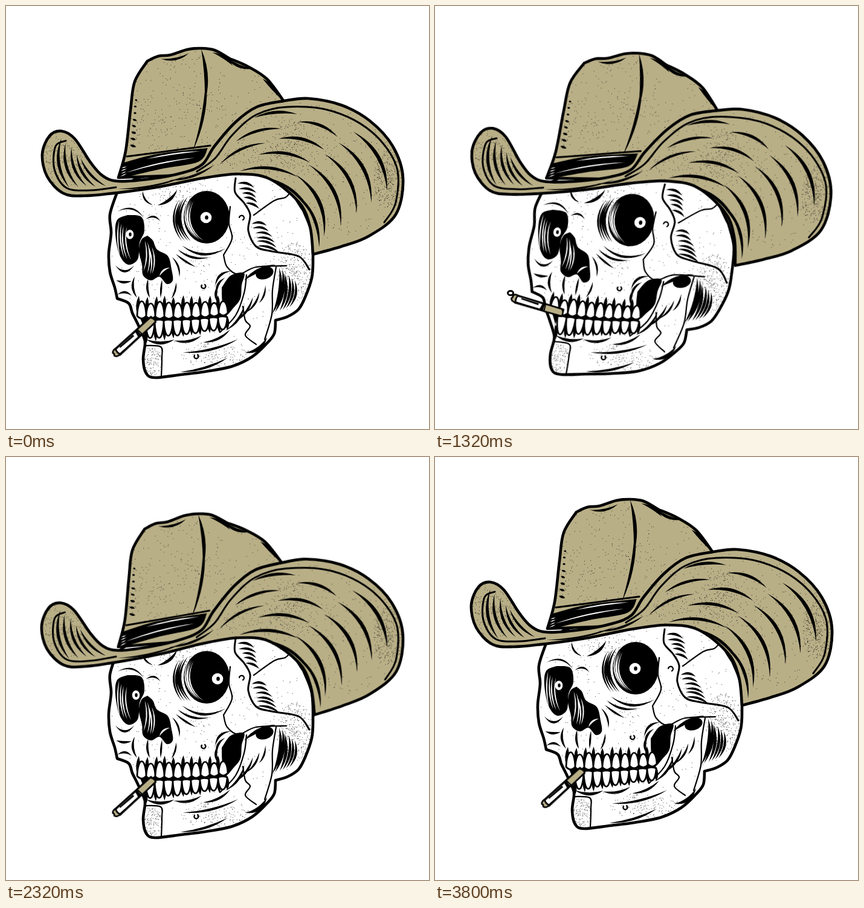
Write an HTML page that moves like this. It is 700 by 700 pixels and loops after 4 s.

```html
<!DOCTYPE html>
<html lang="en">
<head>
<meta charset="utf-8">
<title>Cowboy skull</title>
<style>
html, body { margin: 0; width: 100%; height: 100%; overflow: hidden; background: #fff; }
svg { display: block; width: 100vw; height: 100vh; }
path, ellipse, circle { stroke-linecap: round; stroke-linejoin: round; }
.line { fill: none; stroke: #000; stroke-width: 3; }
.thin { fill: none; stroke: #000; stroke-width: 2.2; }
.shape { stroke: #000; stroke-width: 4.6; }
.tan { fill: #b9af87; }
.bone { fill: #fff; }
.dots { fill: none; stroke: #000; stroke-width: .85; }
.hair { fill: #fff; }

#hat, #skull, #cig, #eyeL, #eyeR, #puff, #ball, #drop, #ash {
  animation: 4s ease-in-out infinite;
}
#hat { animation-name: hat; }
#skull { animation-name: skull; }
#cig { animation-name: cig; }
#eyeL { animation-name: eyeL; }
#eyeR { animation-name: eyeR; }
#puff { animation-name: puff; }
#ball { animation-name: ball; }
#drop { animation-name: drop; }
#ash { animation-name: ash; }

@keyframes hat {
  0%, 9%, 95%, 100% { transform: matrix(1, 0, 0, 1, 0, 0); }
  22.5% { transform: matrix(1, 0, 0, 1, -8, 6); }
  33%, 36.5% { transform: matrix(1, .055, -.076, 1, 20, -9.5); animation-timing-function: ease-in; }
  42% { transform: matrix(1, 0, -.018, 1, 7, 20); animation-timing-function: ease-out; }
  52%, 81% { transform: matrix(1, -.045, .022, 1, -6.5, 38.5); }
}
@keyframes skull {
  0%, 9%, 95%, 100% { transform: matrix(1, 0, 0, 1, 0, 0); }
  22.5% { transform: matrix(1, 0, 0, 1, -9, 5.5); }
  33%, 36.5% { transform: matrix(.995, .104, -.125, .995, 38, -28); animation-timing-function: ease-in; }
  42% { transform: matrix(1, .052, -.057, 1, 20, -4); animation-timing-function: ease-out; }
  52%, 81% { transform: matrix(1, 0, 0, 1, 0, 15); }
}
@keyframes cig {
  0%, 24%, 54%, 100% { transform: translate(244px, 519px) rotate(138deg); }
  33%, 36.5% { transform: translate(238px, 514px) rotate(191deg); animation-timing-function: linear; }
  42% { transform: translate(236px, 520px) rotate(185deg); }
}
@keyframes eyeL {
  0%, 9%, 95%, 100% { transform: translate(0, 0); }
  20%, 24% { transform: translate(1px, 13px); }
  33%, 36% { transform: translate(8px, 4px); }
  42%, 81% { transform: translate(10px, 1px); }
}
@keyframes eyeR {
  0%, 9%, 95%, 100% { transform: translate(0, 0); }
  20%, 24% { transform: translate(-3px, 9px); }
  33%, 36% { transform: translate(16px, 2px); }
  42%, 81% { transform: translate(19px, 2px); }
}
@keyframes ball {
  0%, 29% { transform: translate(136px, 488px) scale(0); }
  33% { transform: translate(125px, 475px) scale(1); }
  38% { transform: translate(104px, 430px) scale(1.7); }
  38.1%, 100% { transform: translate(104px, 430px) scale(0); }
}
@keyframes puff {
  0%, 36% { transform: translate(115px, 450px) scale(0); }
  42% { transform: translate(96px, 360px) scale(1); animation-timing-function: linear; }
  50% { transform: translate(76px, 345px) scale(.95, .8); }
  56%, 100% { transform: translate(56px, 325px) scale(0); }
}
@keyframes drop {
  0%, 38% { transform: translate(104px, 440px) scale(0); }
  42% { transform: translate(75px, 405px) scale(1); }
  48%, 100% { transform: translate(62px, 375px) scale(0); }
}
@keyframes ash {
  0%, 64%, 68.5%, 100% { transform: translate(0, 0); }
  66% { transform: translate(-1.2px, .6px); }
}
</style>
</head>
<body>
<!-- data-pts: smooth curve through points; | marks a corner, / a new curve -->
<svg viewBox="0 0 700 700">
  <defs>
    <path id="crownShape" data-pts="186 284 198 240 206 172 213 125 234 91 | 252 83 272 81 300 72 322 70 345 73 370 87 | 400 100 432 121 460 158 | 430 250 | 292 280 | 186 284"/>
    <path id="brimShape" data-pts="460 157 500 153 555 164 602 190 640 232 657 285 645 345 600 381 555 398 508 411 | 503 365 485 325 436 286 385 278 325 285 255 299 185 309 130 314 95 310 68 282 60 245 72 215 92 207 114 220 140 259 160 281 186 290 240 286 292 276 325 262 345 232 380 192 415 167 460 157"/>
    <path id="skullShape" data-pts="184 308 172 345 174 375 170 410 172 440 180 466 184 484 | 203 492 209 508 217 524 228 548 230 560 227 585 232 608 247 615 290 610 330 605 375 596 408 580 432 558 444 542 446 520 | 466 514 484 502 495 482 506 450 508 420 506 375 492 338 | 440 275 340 262 215 285 | 184 308"/>
    <clipPath id="crownClip"><use href="#crownShape"/></clipPath>
    <clipPath id="brimClip"><use href="#brimShape"/></clipPath>
    <clipPath id="skullClip"><use href="#skullShape"/></clipPath>
  </defs>

  <g id="puff"><path class="line" data-pts="-34 8 -40 0 -34 -8 -28 -22 -12 -20 10 -24 27 -13 40 8 36 18 26 17 16 4 0 2 6 18 -2 24 -8 13 -20 10 -8 -4 -22 -7 -30 5 -34 8"/></g>
  <path id="drop" class="line" d="M1-8Q-6 0-3 9Q2 7 2-4"/>
  <g id="ball"><ellipse class="line" rx="4.5" ry="3.5"/></g>

  <g id="skull">
    <use href="#skullShape" class="shape bone"/>
    <path class="dots" id="skullDots" clip-path="url(#skullClip)"/>

    <!-- sockets and nose -->
    <path data-pts="201 346 224 349 229 372 221 392 218 419 202 428 188 412 181 378 184 354 201 346"/>
    <ellipse cx="332" cy="349.5" rx="38" ry="43.5"/>
    <path data-pts="234 380 243 388 250 403 268 414 274 436 276 454 266 460 254 448 240 454 227 446 225 428 220 405 224 387 234 380"/>
    <path class="hair" id="hollowInk"/>
    <g id="eyeL"><ellipse class="bone" cx="205" cy="378" rx="6.3" ry="7.8"/><ellipse cx="205.5" cy="378" rx="2.2" ry="3.2"/></g>
    <g id="eyeR"><circle class="bone" cx="331" cy="350" r="9.3"/><ellipse cx="332" cy="350" rx="2.8" ry="3.6"/></g>

    <!-- jaw joint, cheekbone, temple and chin -->
    <path data-pts="357 466 372 446 394 442 390 462 388 484 376 500 364 511 358 490 357 466"/>
    <ellipse cx="428" cy="442" rx="15" ry="10" transform="rotate(-18 428 442)"/>
    <path class="line" data-pts="380 285 379 308 394 326 404 345 401 372 414 398 440 406 484 414 502 436"/>
    <path class="thin" data-pts="371 332 369 360 374 385 360 412 | 366 432 385 444 414 432 464 430 / 398 445 394 475 380 512 354 540 / 447 432 441 470 440 510 428 552 / 392 497 396 520 404 530 396 545 414 560 / 410 346 444 322 462 317 470 309 / 230 562 256 564 258 582 257 613"/>
    <path class="thin" d="M386 350a4 4 0 1 1 6 4M324 462a3.4 3.6 0 1 0 5-1M312 578a3.4 3.6 0 1 0 5-1"/>

    <path id="gums"/>
    <path id="teeth" class="bone" stroke="#000" stroke-width="2.7"/>
    <path id="skullInk"/>

    <g id="cig">
      <path class="bone" stroke="#000" stroke-width="3.4" d="M0-5L80-6Q83 0 80 6L0 6Z"/>
      <path class="tan" stroke="#000" stroke-width="2.4" d="M0-5L30-6L31 6L2 6Q-3 0 0-5Z"/>
      <path d="M32-4L38-4L36 5L32 5ZM42 1L72 2L72 4L42 4Z"/>
      <path id="ash" class="tan" stroke="#000" stroke-width="2.7" d="M79-6Q87-6 88-1Q85 2 87 4Q84 8 79 6Q82 0 79-6Z"/>
    </g>
  </g>

  <g id="hat">
    <use href="#crownShape" class="shape tan"/>
    <path class="dots" id="crownDots" clip-path="url(#crownClip)"/>
    <path data-pts="192 260 250 245 334 235 | 318 258 255 270 187 286 | 192 260"/>
    <path class="line" data-pts="200 249 262 241 338 231"/>
    <path class="hair" id="bandInk"/>
    <path id="crownInk"/>
    <use href="#brimShape" class="shape tan"/>
    <path class="dots" id="brimDots" clip-path="url(#brimClip)"/>
    <path class="line" data-pts="316 274 346 252 374 214 414 180 466 167 540 174 606 209 646 265 645 325 626 358 / 182 300 140 305 100 301 80 270 82 232 99 223"/>
    <path id="brimInk"/>
  </g>
</svg>

<script>
const setPath = (id, ...parts) => document.getElementById(id).setAttribute('d', parts.join(''));

let seed = 7;
const rnd = () => (seed = seed * 16807 % 2147483647) / 2147483647;

// Catmull-Rom curve as cubic segments
function spline(pts) {
  return pts.slice(1).map((q, i) => {
    const p = pts[i], before = pts[i - 1] || p, after = pts[i + 2] || q;
    const c1 = p.map((v, k) => v + (q[k] - before[k]) / 6);
    const c2 = q.map((v, k) => v - (after[k] - p[k]) / 6);
    return `C${[...c1, ...c2, ...q].map(v => v.toFixed(1)).join(' ')}`;
  }).join('');
}

function curve(text) {
  return text.split('/').map(part => {
    let last, d = '';
    for (const run of part.split('|')) {
      const pts = run.match(/-?\d+ -?\d+/g).map(p => p.split(' ').map(Number));
      if (last) pts.unshift(last);
      else d = `M${pts[0].join(' ')}`;
      d += spline(pts);
      last = pts[pts.length - 1];
    }
    return d;
  }).join('');
}

// Tapered pen stroke, bowed sideways by bend
function stroke(x0, y0, x1, y1, bend, w) {
  const len = Math.hypot(x1 - x0, y1 - y0);
  const nx = (y0 - y1) / len, ny = (x1 - x0) / len;
  const ctrl = k => `${(x0 + x1) / 2 + nx * k} ${(y0 + y1) / 2 + ny * k}`;
  return `M${x0} ${y0}Q${ctrl(2 * bend + w)} ${x1} ${y1}Q${ctrl(2 * bend - w)} ${x0} ${y0}Z`;
}

// A family of n strokes that changes evenly from a to b
function hatch(n, a, b, wobble = 1.5) {
  let d = '';
  for (let i = 0; i < n; i++) {
    const t = i / (n - 1);
    d += stroke(...a.map((v, k) => v + (b[k] - v) * t + (k < 4 ? (rnd() - .5) * wobble * 2 : 0)));
  }
  return d;
}

// Grain in a soft elliptical patch
function grain(cx, cy, rx, ry, n) {
  let d = '';
  for (let i = 0; i < n; i++) {
    const a = rnd() * Math.PI * 2, r = Math.pow(rnd(), .62);
    d += `M${(cx + rx * r * Math.cos(a)).toFixed(1)} ${(cy + ry * r * Math.sin(a)).toFixed(1)}h.1`;
  }
  return d;
}

function tooth(a, b, base, tip, point) {
  const m = (a + b) / 2, k = base + (tip - base) * 1.3;
  return `M${a} ${base}C${a + 1} ${k} ${b - 1} ${k} ${b} ${base}Q${m} ${base + point} ${a} ${base}Z`;
}

function drawTeeth() {
  let d = '';
  for (let i = 0; i < 10; i++) {
    const a = 217 + i * 15, b = a + 15;
    const bite = 517 - i * .6 + 3 * Math.sin(i / 3);
    d += tooth(a, b, bite - 4, 488 + 4 * rnd(), 8);
    if (i) d += tooth(a - 1, b - 1, bite + 3, 551 - i * 2 + 4 * rnd(), -3);
  }
  setPath('teeth', d);
  setPath('gums',
    'M217 505L367 500L364 524L230 536Z',
    hatch(11, [217, 508, 219, 481, 0, 6], [367, 504, 366, 479, 0, 6]),
    hatch(10, [231, 526, 233, 557, 0, 6], [365, 512, 367, 538, 0, 6]));
}

document.querySelectorAll('[data-pts]').forEach(p => p.setAttribute('d', curve(p.dataset.pts)));
drawTeeth();

setPath('hollowInk',
  hatch(4, [188, 356, 190, 414, 3, 2], [199, 366, 207, 422, 5, 2]),
  hatch(4, [303, 318, 314, 386, 13, 2], [310, 324, 326, 388, 14, 2]),
  hatch(4, [229, 388, 229, 440, -4, 2], [240, 398, 242, 444, -4, 2]),
  stroke(254, 447, 271, 433, -3, 3));

const eyes = [
  hatch(4, [300, 314, 306, 390, 15, 4], [286, 322, 292, 388, 11, 3]),
  hatch(4, [290, 396, 362, 400, 12, 4], [276, 416, 288, 448, -4, 3]),
  hatch(2, [184, 340, 228, 350, -10, 3], [232, 352, 257, 357, -6, 3]),
  hatch(2, [226, 307, 242, 330, 5, 3], [284, 304, 251, 331, -5, 5])
];
const cheeks = [
  hatch(3, [180, 428, 211, 428, 10, 4], [184, 477, 207, 481, -5, 4]),
  hatch(4, [214, 449, 218, 484, 5, 4], [282, 456, 274, 484, -2, 3]),
  hatch(5, [382, 294, 411, 302, -4, 4], [396, 326, 419, 334, -3, 4]),
  hatch(6, [408, 361, 432, 365, -4, 4], [416, 397, 452, 408, -4, 4])
];
const jaw = [
  hatch(3, [372, 438, 345, 462, 7, 4], [350, 462, 354, 494, 5, 4]),
  hatch(6, [451, 432, 440, 508, -7, 6], [478, 454, 470, 498, -6, 4]),
  hatch(4, [430, 462, 418, 492, -3, 3], [396, 494, 362, 538, -6, 4]),
  hatch(3, [232, 550, 278, 553, 6, 5], [326, 556, 372, 536, 5, 4]),
  hatch(2, [292, 572, 384, 551, 6, 4], [288, 605, 366, 582, 5, 4]),
  stroke(396, 574, 432, 548, 7, 6),
  stroke(394, 454, 446, 428, -4, 6)
];
setPath('skullInk', ...eyes, ...cheeks, ...jaw);

setPath('bandInk',
  hatch(2, [200, 277, 312, 252, -3, 2], [232, 254, 322, 240, -2, 2]),
  hatch(4, [191, 268, 200, 265, 0, 1.6], [189, 282, 200, 277, 0, 1.6], .5));

setPath('crownInk',
  hatch(8, [213, 155, 217, 156, 0, 3], [205, 230, 215, 233, 0, 4], .5),
  stroke(323, 71, 329, 160, -5, 6),
  stroke(331, 110, 309, 240, -7, 5),
  hatch(2, [256, 87, 303, 78, 5, 4], [340, 76, 374, 98, -3, 4]),
  hatch(2, [364, 84, 410, 105, 5, 5], [424, 120, 458, 156, -2, 6]));

setPath('brimInk',
  hatch(5, [92, 219, 106, 302, 11, 5], [124, 252, 164, 297, 6, 4]),
  hatch(2, [186, 301, 300, 280, 6, 3], [270, 290, 346, 262, 6, 4]),
  hatch(4, [386, 274, 482, 282, -10, 5], [482, 191, 548, 216, -8, 5]),
  hatch(3, [352, 262, 430, 226, -8, 4], [410, 184, 482, 178, -6, 5]),
  hatch(5, [478, 280, 527, 383, -17, 6], [574, 208, 631, 306, -15, 6]),
  hatch(2, [430, 283, 508, 352, -12, 5], [488, 316, 518, 398, -9, 5]));

setPath('crownDots', grain(320, 165, 140, 100, 300), grain(240, 205, 45, 40, 60));
setPath('brimDots',
  grain(500, 270, 170, 120, 420), grain(634, 286, 26, 50, 330), grain(470, 225, 30, 46, 150),
  grain(98, 250, 36, 50, 200), grain(410, 250, 60, 32, 100));
setPath('skullDots',
  grain(330, 430, 180, 180, 420), grain(478, 440, 30, 50, 300),
  grain(242, 588, 16, 24, 120), grain(350, 576, 60, 20, 150), grain(285, 310, 70, 26, 130));
</script>
</body>
</html>
```
